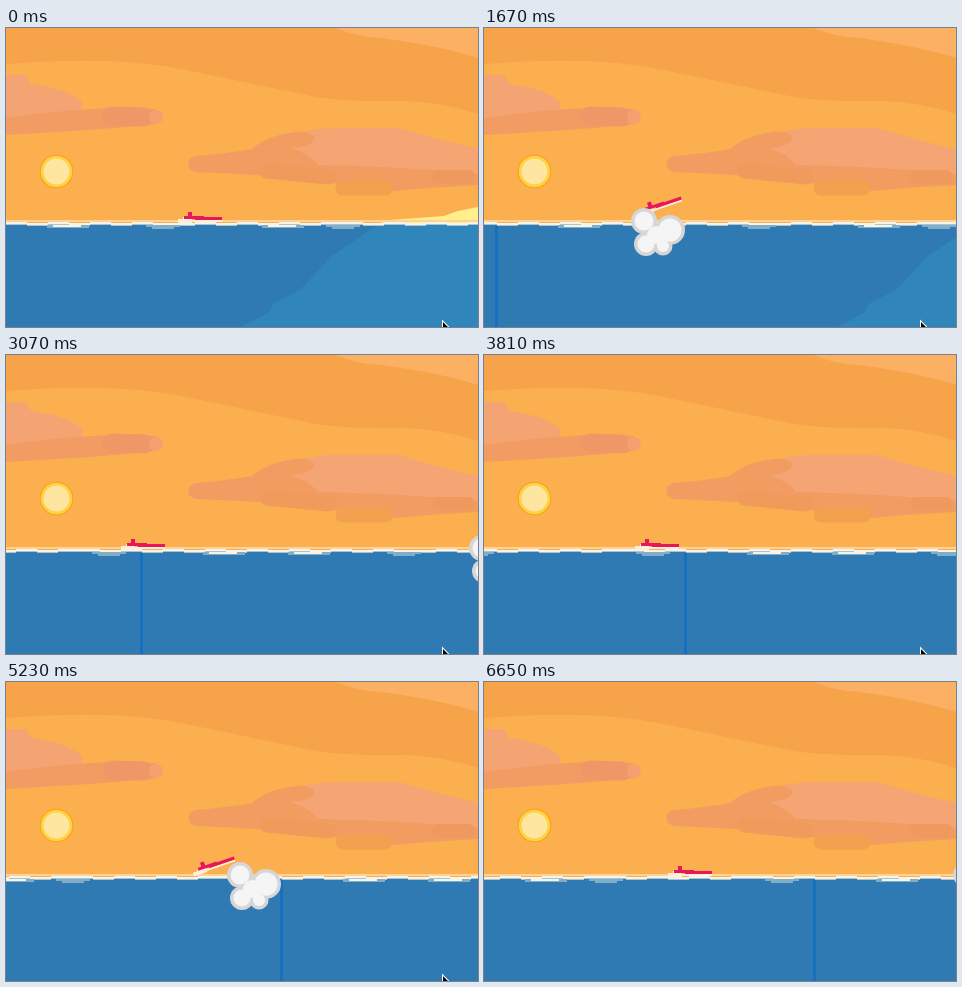
An HTML page with a canvas for the animation above (6.86 s loop, 472 by 299 pixels).

```html
<!DOCTYPE html>
<html lang="en">
<head>
<meta charset="utf-8">
<title>Plane over the sea</title>
<style>
  html, body { margin: 0; width: 100%; height: 100%; overflow: hidden; background: #fbaf4f; }
  canvas { display: block; width: 472px; height: 299px; }
</style>
</head>
<body>
<canvas id="stage" width="472" height="299"></canvas>
<script>
const W = 472, H = 299, LOOP = 6860, LAST = 6650;
const STEPS = 113, FIRST = 30, STEP = (LAST - FIRST) / STEPS;
const TILE = 651, TURN = 4470;
const FOAM = '#f9f3e6', SHADE = '#80adc8', PINK = '#e8175c', CREAM = '#fdf0d8';
const ctx = document.getElementById('stage').getContext('2d');

// Time advances in even steps and rests at the end
function stepTime(t) {
  const n = Math.floor((t - FIRST) / STEP + 0.25);
  return n < 0 ? 0 : FIRST + Math.min(n, STEPS) * STEP;
}

// The sea speeds up gently, then nearly stops and starts again
function seaOffset(t) {
  return t < TURN
    ? 373 * (t / TURN) ** 1.17
    : 373 + 63 * ((t - TURN) / (LAST - TURN)) ** 2;
}

function planeX(t) {
  const keys = [[0, 199], [1030, 184], [2250, 178], [3070, 142], [TURN, 213], [LOOP, 211]];
  const i = keys.findIndex(([time]) => t < time);
  const [t0, a] = keys[i - 1], [t1, b] = keys[i];
  return a + (b - a) * (t - t0) / (t1 - t0);
}

function hop(t, from, to, height) {
  return t > from && t < to ? height * Math.sin(Math.PI * (t - from) / (to - from)) : 0;
}

function box(color, x, y, w, h) {
  ctx.fillStyle = color;
  ctx.fillRect(x, y, w, h);
}

function shape(color, path) {
  ctx.fillStyle = color;
  ctx.fill(new Path2D(path));
}

function disc(color, x, y, r) {
  ctx.fillStyle = color;
  ctx.beginPath();
  ctx.arc(x, y, r, 0, Math.PI * 2);
  ctx.fill();
}

function streak(color, x0, y0, x1, y1, width) {
  ctx.strokeStyle = color;
  ctx.lineWidth = width;
  ctx.lineCap = 'round';
  ctx.beginPath();
  ctx.moveTo(x0, y0);
  ctx.lineTo(x1, y1);
  ctx.stroke();
}

function drawSky() {
  box('#fbaf4f', 0, 0, W, H);
  shape('#f6a34a', 'M0 0H472V86Q440 75 400 73Q340 74 310 69L180 42Q110 27 0 36Z');
  shape('#fbb063', 'M330 0Q350 9 375 10Q435 18 472 30V0Z');

  shape('#f4a373', 'M0 47H20L25 56Q60 60 76 74V84L0 92Z');
  shape('#f29c64', 'M0 90Q90 77 150 81V96Q110 101 0 107Z');
  streak('#f09768', 106, 88, 138, 89, 19);
  disc('#f5a070', 150, 89, 7);

  shape('#f4a573', 'M245 122Q285 101 330 100H394Q420 109 472 121V152H300Z');
  shape('#f29c62', 'M190 128Q225 125 246 121Q262 107 290 104C315 102 315 119 285 120Q305 127 312 137Q390 138 472 146V157Q430 159 388 163L318 154Q260 146 190 144C180 142 180 130 190 128Z');
  streak('#f09a5c', 261, 143, 322, 149, 15);
  streak('#f3a04f', 337, 160, 379, 160, 15);
  streak('#f0995f', 433, 149, 462, 149, 14);

  disc('#f9a012', 50.5, 143.5, 16.8);
  disc('#fdd244', 50.5, 143.5, 15.8);
  disc('#fee5a0', 50.5, 143.5, 13);
}

function drawSurface() {
  box('#fcd49a', 0, 192, TILE, 2);
  for (let x = 0; x < TILE; x += 21) {
    const y = Math.round(195.4 + 0.8 * Math.sin(x * 0.13));
    box(FOAM, x, y - 1, 21, 2);
    box('#a9c4d2', x, y + 1, 21, 1);
  }
  for (const x of [157, 337, 513]) {
    box(SHADE, x - 17, 197, 34, 2);
    box(SHADE, x - 11, 199, 22, 2);
  }
  for (const x of [62, 277, 628]) {
    box(SHADE, x - 21, 197, 42, 3);
    box(FOAM, x - 15, 197, 28, 2);
  }
}

function drawSea(off) {
  ctx.save();
  ctx.translate(off, 0);
  box('#2f7ab2', -off, 197, W, H - 197);
  shape('#3086bb', 'M372 197L326 228L294 262L268 275L262 285L235 299H545V197Z');
  box('#1670c0', -107, 198, 3, H - 198);
  shape('#fff08c', 'M374 195L384 192L438 188L452 183L472 179H545V195Z');
  ctx.translate(-TILE, 0);
  drawSurface();
  ctx.translate(TILE, 0);
  drawSurface();
  ctx.restore();
}

function drawPlane(t) {
  const lift = hop(t, 1440, 2040, 16) + hop(t, 4720, 5370, 16);
  const facing = t > 3800 && t < 4720 ? -1 : 1;
  ctx.save();
  ctx.translate(Math.round(planeX(t)), Math.round(190 - lift));
  ctx.scale(facing, 1);
  ctx.rotate(-0.33 * Math.min(1, lift / 6));
  box(CREAM, -27, 1, 14, 4);
  box(CREAM, -22, -1, 9, 3);
  box(CREAM, -13, 2, 30, 2);
  box(PINK, -17, -6, 4, 6);
  box(PINK, -21, -2, 20, 3);
  box(PINK, -10, -1, 27, 3);
  ctx.restore();
}

function drawCloud(x) {
  const petals = [[-14, 193, 13], [12, 202, 15], [-12, 216, 12], [5, 218, 9.5]];
  for (const [dx, y, r] of petals) disc('#d6d6d6', x + dx, y, r);
  for (const [dx, y, r] of petals) disc('#f5f5f5', x + dx, y, r - 3.5);
  disc('#f5f5f5', x - 2, 207, 9);
}

function drawCursor() {
  const arrow = new Path2D('M437 294V304L440 301L443 300Z');
  ctx.strokeStyle = '#fff';
  ctx.lineWidth = 2;
  ctx.stroke(arrow);
  ctx.fillStyle = '#000';
  ctx.fill(arrow);
}

function draw(t) {
  const off = Math.round(seaOffset(t));
  drawSky();
  drawSea(off);
  drawPlane(t);
  // Clouds drift over the sea, evenly spaced
  for (const k of [0, 1]) drawCloud(Math.round(off + 0.1375 * t - 174 - 680 * k));
  if (t < 6600) drawCursor();
}

const start = performance.now();
function tick() {
  draw(stepTime((performance.now() - start) % LOOP));
  requestAnimationFrame(tick);
}
tick();
</script>
</body>
</html>
```
